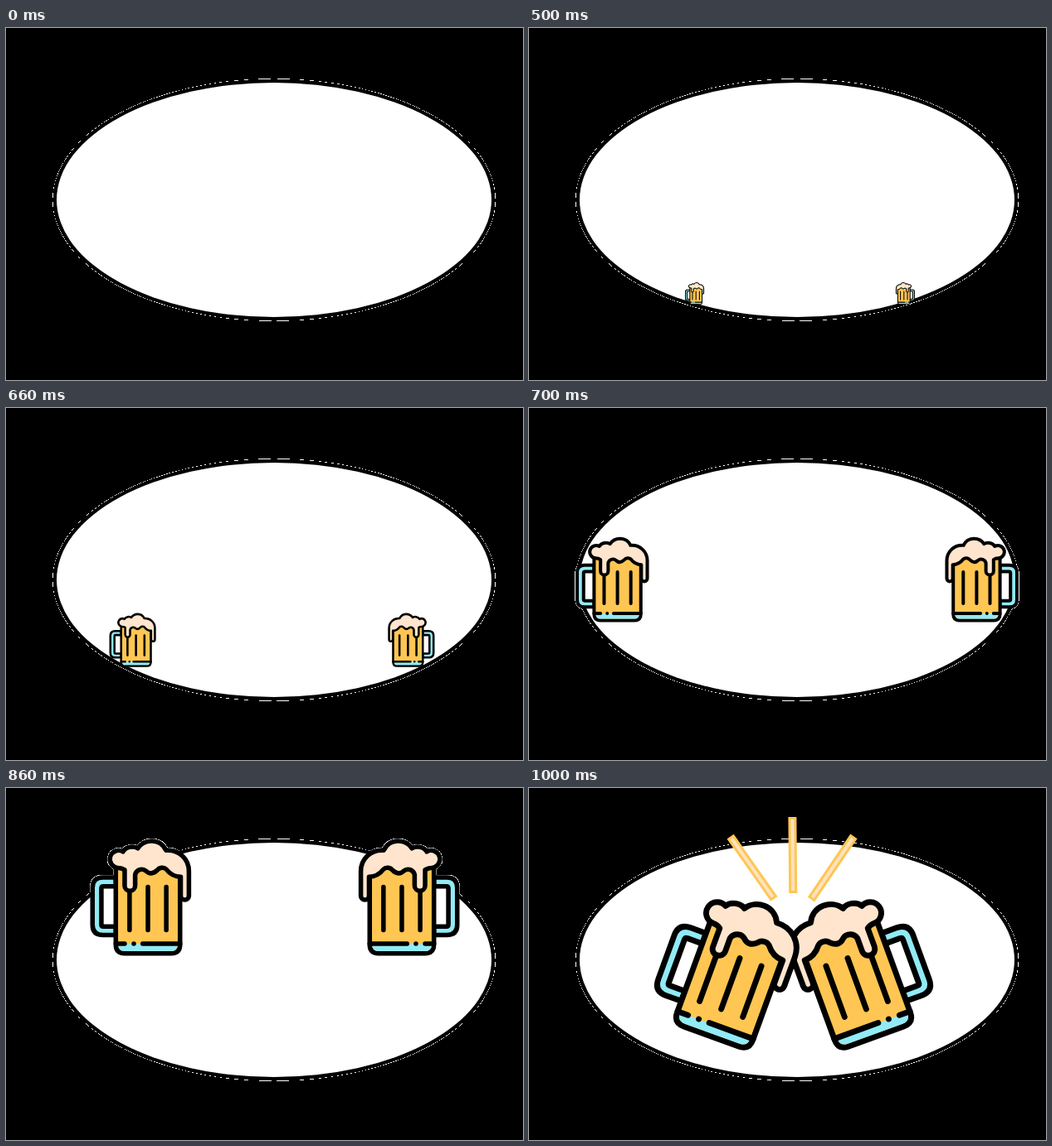
Recreate the animation shown at these times as an HTML page. Size 623x425 px, loop 1.1 s.

```html
<!DOCTYPE html>
<html lang="en">
<head>
<meta charset="utf-8">
<title>Cheers</title>
<style>
  html, body { margin: 0; height: 100%; overflow: hidden; background: #000; }
  svg { display: block; }
</style>
</head>
<body>
<svg width="623" height="425" viewBox="0 0 623 425">
  <defs>
    <g id="mug" stroke-linecap="round" stroke-linejoin="round">
      <path fill="#91ebf6" d="M184 160.500H164.500Q148.500 160.500 148.500 176V233Q148.500 248.500 164.500 248.500H184V235.500H165Q162 235.500 162 232.500V177Q162 174 165 174H184Z"/>
      <path fill="#ffc653" d="M184 140V263Q184 276.500 197.500 276.500H268.500Q282 276.500 282 263V140Z"/>
      <path fill="#91ebf6" stroke="none" d="M187.500 262H278.500V263Q278.500 273 268.500 273H197.500Q187.500 273 187.500 263Z"/>
      <path fill="none" d="M184 261.800H197.500M211.500 261.800h.01M225 261.800H282M205 183V241M233 175V241M261 175V241"/>
      <path fill="#ffe5cd" d="M188 146A13.400 13.400 0 1 1 195 121C199 113.500 211 111.500 217.500 116C227 101 252 100 260.500 119C280 117.500 295.500 132 295.500 151V188.500A6.250 6.250 0 0 1 283 188.500V159.500C273 159.500 266 154.500 261 148C257 144 250 145.500 247 149.500C241 155.500 235 155.500 230 150.500C224 145.500 215.500 149 213.500 156V173A8 8 0 0 1 197.500 173V149Q193 146 188 146Z"/>
    </g>
    <rect id="ray" x="-3.500" y="-44.500" width="7" height="89" fill="#ffe2c0" stroke="#ffc653" stroke-width="3"/>
  </defs>

  <g shape-rendering="crispEdges">
    <ellipse cx="323" cy="207.500" rx="267" ry="146.500" fill="#fff"/>
    <g id="halos" stroke="#fff"><use class="right" href="#mug"/><use class="left" href="#mug"/></g>
    <ellipse cx="323" cy="207.500" rx="266.600" ry="146.100" fill="#000"/>
  </g>
  <ellipse cx="323" cy="207.500" rx="262" ry="141.500" fill="#fff"/>
  <g id="mugs" stroke="#000" stroke-width="7"><use class="right" href="#mug"/><use class="left" href="#mug"/></g>
  <g id="rays">
    <use href="#ray" transform="translate(317.800 81) rotate(-.5)"/>
    <use href="#ray" transform="translate(269 96.300) rotate(-35)"/>
    <use href="#ray" transform="translate(365.700 96.500) rotate(34)"/>
  </g>
</svg>
<script>
  const LOOP = 1100, REST = 500, STEP = 100;
  const $ = id => document.getElementById(id);
  const place = (x, y, scale) => `translate(${x} ${y}) scale(${scale}) translate(-145 -101)`;

  // Left mug transform, sum of mirrored x positions, scale
  const poses = [
    [place(188, 307, .15), 653, .15],
    [place(124.5, 247.5, .365), 641, .365],
    [place(56, 155.5, .575), 646, .575],
    [place(101.5, 61, .79), 648, .79],
    [place(145, 101, 1), 646, 1],
    ["translate(232 266) rotate(20) scale(.99) translate(-233 -240)", 638, .99]
  ];

  function show(id, visible) {
    $(id).style.display = visible ? "" : "none";
  }

  function draw(now) {
    const step = Math.floor((now % LOOP - REST) / STEP);
    const pose = poses[step];
    show("mugs", pose);
    show("halos", pose);
    show("rays", step === poses.length - 1);
    if (pose) {
      const [left, mirror, scale] = pose;
      for (const mug of document.querySelectorAll(".left")) mug.setAttribute("transform", left);
      for (const mug of document.querySelectorAll(".right"))
        mug.setAttribute("transform", `translate(${mirror} 0) scale(-1 1) ${left}`);
      $("halos").setAttribute("stroke-width", 7 + 1.2 / scale);
    }
    requestAnimationFrame(draw);
  }
  draw(performance.now());
</script>
</body>
</html>
```
